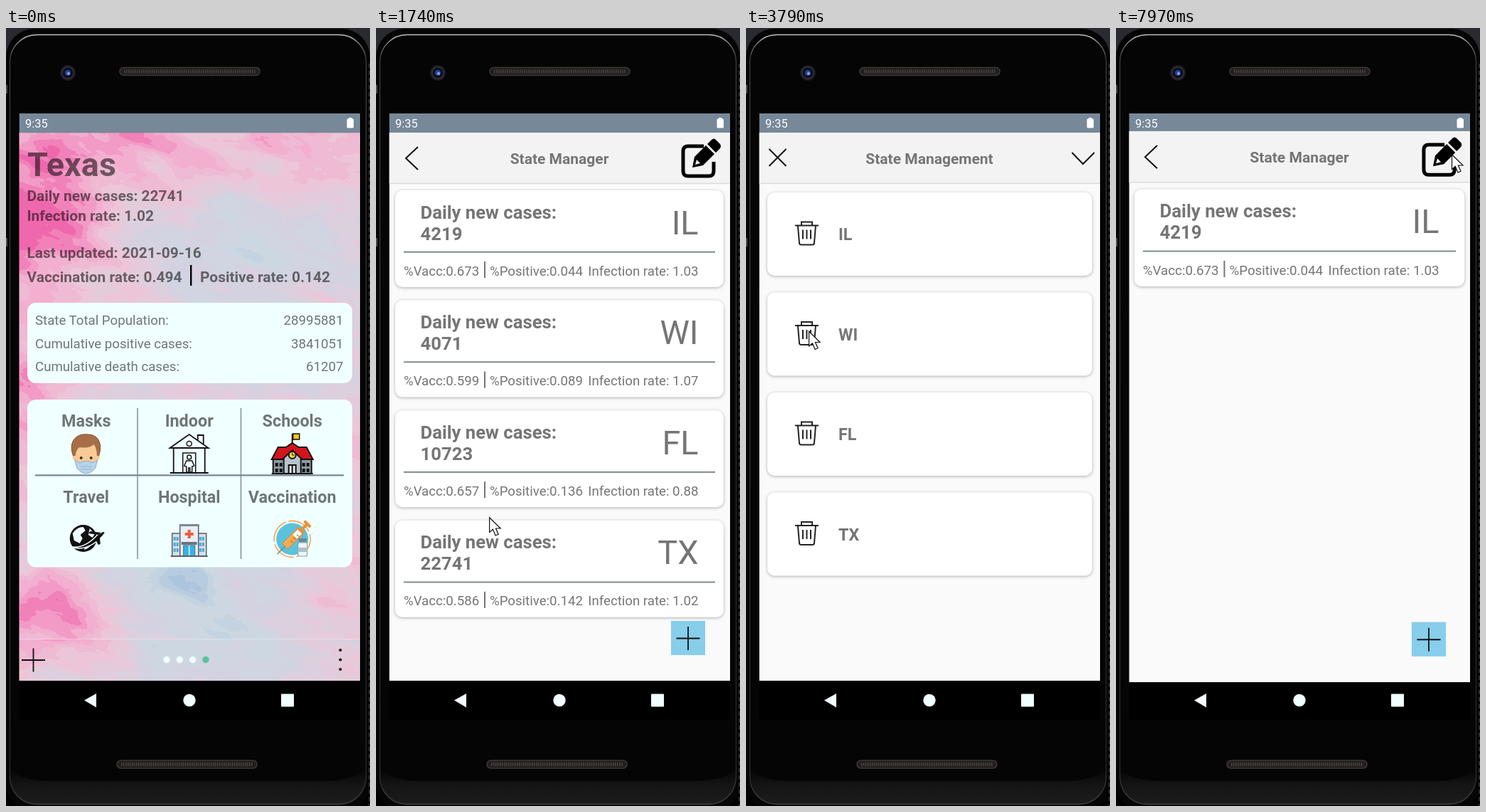
These frames come from a looping animation (512x1093 px, 7.99 s). An HTML page with a canvas:

```html
<!DOCTYPE html>
<html lang="en">
<head>
<meta charset="utf-8">
<title>State tracker</title>
<style>
html, body { margin: 0; width: 100%; height: 100%; overflow: hidden; background: #000; }
body { position: relative; contain: strict; }
svg, .win { position: absolute; left: 0; top: 0; width: 512px; height: 1093px; }
svg { overflow: hidden; }
#screen { position: absolute; inset: 0; overflow: hidden; clip-path: inset(120px 14px 121px 18.5px); }
.win { transform-origin: 258px 532px; }
canvas { position: absolute; left: 18px; top: 147px; }
text { font-family: Roboto, "Open Sans", sans-serif; fill: #757575; }
#home text { fill: #000; fill-opacity: .54; }
#top text { fill: #fff; }
.card { fill: #fff; filter: drop-shadow(0 1px 2px rgba(0,0,0,.3)); }
</style>
</head>
<body>
<svg id="phone" viewBox="0 0 512 1093"></svg>
<div id="screen">
  <div class="win" id="home"></div>
  <div class="win" id="manager"></div>
  <div class="win" id="editor"></div>
</div>
<svg id="top" viewBox="0 0 512 1093"></svg>
<script>
const $ = id => document.getElementById(id);
const LOOP = 7990, INK = '#111', SLATE = '#778899', ICE = '#f0ffff';

// Markup helpers
const attrs = (a = {}) => Object.entries(a).map(([k, v]) => ` ${k}="${v}"`).join('');
const rect = (x, y, w, h, fill, a) => `<rect x="${x}" y="${y}" width="${w}" height="${h}" fill="${fill}"${attrs(a)}/>`;
const circle = (x, y, r, fill, a) => `<circle cx="${x}" cy="${y}" r="${r}" fill="${fill}"${attrs(a)}/>`;
const path = (d, fill, stroke = 'none', w = 2, a) =>
  `<path d="${d}" fill="${fill}" stroke="${stroke}" stroke-width="${w}"${attrs(a)}/>`;
const line = (d, stroke = INK, w = 2, a) => path(d, 'none', stroke, w, a);
const edge = (stroke, w = 1.5) => ({ stroke, 'stroke-width': w });
const label = (s, x, y, size, bold, anchor = 'start') =>
  `<text x="${x}" y="${y}" font-size="${size}" font-weight="${bold ? 700 : 400}" text-anchor="${anchor}">${s}</text>`;
const at = (x, y, s) => `<g transform="translate(${x} ${y})">${s}</g>`;
const each = (list, fn) => list.map(fn).join('');
const svg = s => `<svg viewBox="0 0 512 1093">${s}</svg>`;
const card = (x, y, w, h) => `<rect class="card" x="${x}" y="${y}" width="${w}" height="${h}" rx="10"/>`;
const plus = (x, y, r) => line(`M${x - r} ${y}h${2 * r}M${x} ${y - r}v${2 * r}`, INK, 1.8);
const bars = rect(18.5, 120, 479.5, 27.3, SLATE) + rect(18.5, 917, 479.5, 90, '#000');
const page = title => bars + rect(18.5, 147, 479.5, 770, '#fafafa') + rect(18.5, 147, 479.5, 71, '#f3f3f3') +
  rect(18.5, 217.6, 479.5, 1.6, '#dcdcdc') + label(title, 258, 190.7, 21, 1, 'middle');

// Phone body
const gradient = (id, ...stops) => `<linearGradient id="${id}" x2="0" y2="1">${
  each(stops, ([o, c]) => `<stop offset="${o}" stop-color="${c}"/>`)}</linearGradient>`;
const grille = (x, y) => rect(x, y, 197, 11, '#221e1e', { rx: 5.5, ...edge('#3d3838') }) +
  line(`M${x + 6} ${y + 5.5}h185`, '#4a4444', 5, { 'stroke-dasharray': '1.5 1.5' });
$('phone').innerHTML = gradient('base', [0, '#000'], [.5, '#141414'], [1, '#1d1d1d']) +
  gradient('rim', [0, '#b9c0bd'], [.03, '#3c403f'], [.95, '#262828'], [1, '#444']) +
  rect(0, 0, 512, 60, '#2a2a31') + rect(0, 1, 512, 1100, '#050505', { rx: 40 }) +
  path('M6 1035Q8 1056 60 1058H450Q503 1056 506 1035V1052Q504 1091 466 1091H46Q8 1091 6 1052Z', 'url(#base)') +
  rect(5.5, 9.5, 501, 1081, 'none', { rx: 38, ...edge('url(#rim)', 1.3) }) +
  line('M1 80v12M1 295v12', '#48484b') + line('M511 50V1093', '#55555a', 1, { 'stroke-dasharray': '6 4' }) +
  grille(160, 55.5) + grille(156, 1029) +
  circle(87, 63, 11, '#1c1c22') + circle(87, 63, 8, '#0c0e16', edge('#30333e')) +
  circle(87, 63, 4, '#27439a') + circle(88, 64, 2, '#83a6ee');

// Marbled wallpaper: soft pink and blue pools, warped and streaked by noise
let seed = 7;
const random = () => (seed = (seed * 16807) % 2147483647) / 2147483647;
const lattice = Array.from({ length: 4096 }, random);
const cell = (x, y) => lattice[(x & 63) + 64 * (y & 63)];
const fade = u => u * u * (3 - 2 * u);
const mix = (a, b, u) => a + (b - a) * u;
function noise(x, y) {
  const i = Math.floor(x), j = Math.floor(y), u = fade(x - i);
  return mix(mix(cell(i, j), cell(i + 1, j), u), mix(cell(i, j + 1), cell(i + 1, j + 1), u), fade(y - j)) - .5;
}
function fbm(x, y) {
  let sum = 0;
  for (let k = 0, amp = .52; k < 4; k++, amp /= 2) sum += amp * noise(x * 2.1 ** k, y * 2.1 ** k);
  return sum;
}
// Pool: x, y, width, height, pinkness
const pools = [
  [30, 280, 130, 150, .45], [230, 160, 260, 90, .28], [440, 180, 80, 60, .1], [320, 300, 110, 60, -.25],
  [30, 520, 70, 130, .35], [60, 830, 130, 70, .36], [215, 790, 65, 70, -.48], [330, 850, 60, 90, -.2], [470, 700, 90, 220, .14]
];
const ramp = [[172, 196, 222], [203, 216, 226], [213, 210, 224], [235, 200, 217], [243, 170, 205], [239, 104, 173]];
function tint(v) {
  const f = Math.max(0, Math.min(.999, Math.round(v * 13) / 13)) * 5, i = Math.floor(f);
  return ramp[i].map((c, k) => mix(c, ramp[i + 1][k], f - i));
}
function wallpaper() {
  const w = 480, h = 770, cv = document.createElement('canvas');
  cv.width = w; cv.height = h;
  const ctx = cv.getContext('2d'), img = ctx.createImageData(w, h);
  for (let y = 0, o = 0; y < h; y++) for (let x = 0; x < w; x++, o += 4) {
    const py = y > 711 ? y + 90 : y;
    const wx = x + 18 + 80 * fbm(x / 75, py / 75), wy = y + 147 + 80 * fbm(x / 75 + 30, py / 75 + 12);
    let v = .45 + .5 * fbm((x + py * .5) / 70 + 5, (py - x * .4) / 32 + 9);
    for (const [cx, cy, rx, ry, pink] of pools) v += pink * Math.exp(-(((wx - cx) / rx) ** 2) - ((wy - cy) / ry) ** 2);
    img.data.set([...tint(v), 255], o);
  }
  ctx.putImageData(img, 0, 0);
  return cv;
}

// Tile icons, centred on 0,0
const icons = {
  mask: path('M-16 8C-28-16-14-29 2-27 20-27 24-10 16 8z', '#a76f48', '#7c4f31', 1) +
    path('M-15 2Q-14-6-9-9 4-7 11-13 16-6 15 8 12 26 0 27-13 25-15 2z', '#f7ca96') +
    each([-1, 1], s => circle(16 * s, 6, 3, '#f7ca96') + circle(7 * s, 6, 2, '#333')) +
    path('M-16 9L-9 13Q0 8 9 13L16 9 13 20Q8 27 0 28-8 27-13 20z', '#b8d4ec', '#8caac8', 1) +
    line('M-8 18H8M-8 22H8', '#96b4d0', 1),
  house: line('M-27-8L0-27 27-8zM-22-8V27H22V-8M12-18V-26H20V-13M-27 27H27', INK, 1.8) +
    circle(0, -14, 3.5, 'none', edge(INK)) + rect(-9, -1, 18, 28, 'none', edge(INK)) +
    circle(0, 5, 3, 'none', edge(INK)) + line('M-4 10H4L7 17 4 18V26H1V20H-1V26H-4V18L-7 17z', INK, 1.5),
  school: rect(-27, 8, 54, 20, '#8e9aa5', edge(INK, 2)) + path('M-12 28V0L0-9 12 0V28z', '#b9c3cb', INK) +
    path('M-29 8L-20-9H-9L0-15 9-9H20L29 8H14L0-5-14 8z', '#d2151d', INK) +
    line('M0-15V-28') + rect(1, -28, 9, 8, '#f9c51b', edge(INK)) +
    circle(0, 2, 5, '#f8cd48', edge(INK, 2)) + line('M0-1V2H3', INK, 1) +
    rect(-5, 16, 10, 12, '#dfe6ea', edge(INK, 2)) + line('M0 16V28M-29 28H29') +
    each([-24, -18, 14, 20], x => rect(x, 13, 4, 5, INK) + rect(x, 21, 4, 5, INK)),
  globe: circle(-4, -1, 19, INK) +
    path('M-19-8Q-13-17-4-17L-1-12-8-6-5-1-9 6-17 2zM5-15L12-7 9-2 3-6zM0 8L8 6Q4 14-3 15z', ICE) +
    path('M-25 10Q-4 16 16-6L24-11 27-9 23-4Q0 20-25 10z', INK, ICE, 1.4) +
    path('M17-6L3-8 6-11 21-9zM19-5L20 7 17 8 13 0z', INK),
  hospital: rect(-24, -8, 48, 32, '#d8e0e6', edge('#55616e')) + rect(-13, -19, 26, 43, '#e9eef2', edge('#55616e')) +
    rect(-14, -21, 28, 3, '#7b8794') + line('M0-13V-1M-6-7H6', '#ef5b40', 4) +
    rect(-8, 9, 16, 15, '#35b4e8', edge('#4b6577', 1)) + line('M0 9V24', '#dff4ff', 1.6) + rect(-11, 4, 22, 4, '#677583') +
    each([-21, -17, 15, 19], x => each([-3, 5, 13], y => rect(x - 1, y, 3, 5, '#4ba9d5'))) + line('M-26 24H26', '#55616e'),
  vaccine: circle(0, 0, 25.5, 'none', { ...edge('#f39b45', 1.4), 'stroke-dasharray': '34 4' }) + circle(0, 0, 22.5, '#5bc2dc') +
    `<g transform="rotate(45)">${line('M0 14V30', '#7a8b94', 1.5) + rect(-5, -16, 10, 30, '#fff', edge('#e98b35')) +
      rect(-4, -5, 8, 18, '#f5a84a') + rect(-2, -29, 4, 13, '#ee8f31') + rect(-7, -18, 14, 3, '#ee8f31') + rect(-6, -32, 12, 4, '#ee8f31') +
      line('M0-9H4M0-3H4M0 3H4', '#b65f18', 1)}</g>` +
    rect(8, 5, 13, 19, '#eef4f6', { rx: 2, ...edge('#8ba4ae', 1.2) }) + rect(9, -1, 11, 5, '#73858d') + rect(8, 12, 13, 6, '#aebfc7')
};

// Home
const heads = ['Daily new cases: 22741', 'Infection rate: 1.02', 'Last updated: 2021-09-16', 'Vaccination rate: 0.494'];
const stats = { 'State Total Population:': 28995881, 'Cumulative positive cases:': 3841051, 'Cumulative death cases:': 61207 };
const tiles = { Masks: 'mask', Indoor: 'house', Schools: 'school', Travel: 'globe', Hospital: 'hospital', Vaccination: 'vaccine' };
$('home').append(wallpaper());
$('home').insertAdjacentHTML('beforeend', svg(bars +
  label('Texas', 30, 208, 46.7, 1) +
  each(heads, (s, i) => label(s, 29.5, i < 2 ? 243 + 28 * i : 254.5 + 34 * i, 20.9, 1)) +
  label('Positive rate: 0.142', 273, 356.5, 20.9, 1) + rect(259, 333, 2.4, 29, '#000') +
  rect(30, 386, 457, 113, ICE, { rx: 12 }) +
  each(Object.entries(stats), ([s, n], i) =>
    label(s, 41, 417.3 + i * 32.5, 18.67) + label(n, 474.5, 417.3 + i * 32.5, 18.67, 0, 'end')) +
  rect(30, 522, 457, 235.5, ICE, { rx: 12 }) +
  line('M185 534V746M330.5 534V746', SLATE, 1.4) + line('M41 628.3H475', SLATE, 2.2) +
  each(Object.entries(tiles), ([s, icon], i) => {
    const x = 112.7 + i % 3 * 145, low = i > 2;
    return label(s, x, low ? 667 : 559.5, 23.33, 1, 'middle') + at(x, low ? 718 : 598, icons[icon]);
  }) +
  line('M18 858.5H498', '#ffffff55', 1) + plus(38.5, 888, 16.5) +
  each([0, 1, 2, 3], i => circle(226 + i * 18.3, 887.5, 4.7, i < 3 ? ICE : '#5cc298')) +
  each([-1, 0, 1], i => circle(470.3, 887.5 + i * 13.5, 2.1, INK))));

// State list
const states = [['IL', 4219, 0.673, 0.044, 1.03], ['WI', 4071, 0.599, 0.089, 1.07],
  ['FL', 10723, 0.657, 0.136, 0.88], ['TX', 22741, 0.586, 0.142, 1.02]];
const stateCard = ([name, cases, vacc, positive, rate], i) => `<g class="row">${at(0, i * 154.6,
  card(27, 228, 462, 136) + label('Daily new cases:', 62.5, 267.5, 25.67, 1) + label(cases, 62.5, 297.5, 25.67, 1) +
  label(name, 453.5, 289.5, 46.7, 0, 'end') + rect(39, 313.7, 438, 2, '#7f8c8d') +
  label('%Vacc:' + vacc, 39, 347.5, 18.67) + rect(152, 328, 2, 23, '#757575') +
  label('%Positive:' + positive, 160, 347.5, 18.67) + label('Infection rate: ' + rate, 453.5, 347.5, 18.67, 0, 'end'))}</g>`;
$('manager').innerHTML = svg(page('State Manager') + line('M59 167L42 183 59 199') +
  line('M461 166H439Q432 166 432 173V201Q432 208 439 208H468Q475 208 475 201V188', '#000', 5) +
  path('M445 196L448 181 464 165 476 177 460 193zM466 163L472 157Q475 154 478 157L484 163Q486 166 484 169L478 175z', '#000') +
  path('M449 192l2-7 5 5z', '#f3f3f3') + each(states, stateCard) +
  rect(415, 833, 48, 48, '#87ceeb') + plus(439, 857.5, 16.5));

// Editing list
const trash = line('M69 277.5h33M78 277v-4.5h15v4.5M73 278l2 24q0 2.5 3 2.5h15q3 0 3-2.5l2-24' +
  each([80, 85.5, 91], x => `M${x} 283.5v13`), '#222');
const editCard = ([name], i) => `<g class="row">${at(0, i * 140.5,
  card(30, 231, 457, 117) + trash + label(name, 130, 298.3, 23.33, 1))}</g>`;
$('editor').innerHTML = svg(page('State Management') + line('M32.5 170l24 24m0-24l-24 24') +
  line('M458.5 175L474 191 490 175') + each(states, editCard));

// Fixed overlay and pointer
$('top').innerHTML = label('9:35', 27, 140, 16.4) +
  rect(479.5, 127.5, 9.5, 13, '#fff', { rx: 1.5 }) + rect(482, 126, 4.5, 2, '#fff') +
  path('M110 944.5L127 935V954.5z', ICE) + circle(258, 944.5, 8.7, ICE) + rect(387, 935.5, 18, 18, ICE, { rx: 1 }) +
  `<g id="cursor">${path('M.5 .8V21.5L5.3 17.3 9 26 13 24.3 9.4 16H16z', '#fff', INK, 1.2)}</g>`;

// Motion
const clamp = v => Math.max(0, Math.min(1, v));
const ease = p => 1 - (1 - clamp(p)) ** 4.7;

// Pointer stops: time, x, y, rest
const stops = [
  [110, 355, 1090], [860, 40.5, 881, 620], [1740, 158.5, 688], [2060, 416, 255], [2380, 464, 161], [2530, 461, 181, 370],
  [3500, 42, 398], [3830, 90, 426, 450], [4430, 93, 383], [5070, 83.5, 432, 630],
  [5940, 157, 494, 150], [6270, 160, 489, 370], [7010, 460, 188], [7160, 475, 156], [7320, 472, 177, 670]
];
const route = stops.flatMap(([t, x, y, rest]) => rest ? [[t, x, y], [t + rest, x, y]] : [[t, x, y]]);
const rise = (i, k) => (route[i + 1][k] - route[i][k]) / (route[i + 1][0] - route[i][0]);
function slope(i, k) {
  if (i === 0) return rise(0, k);
  if (i === route.length - 1) return 0;
  const a = rise(i - 1, k), b = rise(i, k);
  return a * b <= 0 ? 0 : 2 * a * b / (a + b);
}
function pointer(t, k) {
  const i = Math.max(0, route.findLastIndex(p => t >= p[0]));
  if (i === route.length - 1) return route[i][k];
  const span = route[i + 1][0] - route[i][0], u = clamp((t - route[i][0]) / span);
  return mix(route[i][k], route[i + 1][k], fade(u)) +
    span * (slope(i, k) * u * (1 - u) ** 2 - slope(i + 1, k) * u * u * (1 - u));
}

function place(id, shown, scale, opacity = 1) {
  const s = $(id).style;
  s.visibility = shown ? 'visible' : 'hidden';
  s.transform = scale === 1 ? 'none' : `scale(${scale})`;
  s.opacity = opacity;
}
const OPEN = 1275, EDIT = 2717, CLOSE = 7785, SHIFT = 400, FADE = 83;
const removals = [4090, 4950, 5400];
const rows = id => [...document.querySelectorAll(`#${id} .row`)];
const managerRows = rows('manager'), editorRows = rows('editor');

function render(t) {
  const [open, edit, close] = [OPEN, EDIT, CLOSE].map(s => ease((t - s) / SHIFT));
  const closing = t >= CLOSE + 35;
  place('home', t < OPEN + SHIFT, 1 + .05 * open);
  place('manager', t >= OPEN && (t < EDIT + SHIFT || closing),
    closing ? 1.1 - .1 * close : (.85 + .15 * open) * (1 + .05 * edit), clamp((t - OPEN) / FADE));
  place('editor', t >= EDIT, closing ? 1 - .1 * close : .85 + .15 * edit,
    closing ? 1 - clamp((t - CLOSE - 35) / FADE) : clamp((t - EDIT) / FADE));

  const gone = removals.filter(s => t >= s).length;
  const left = [states[0], ...states.slice(1 + gone)];
  editorRows.forEach((row, i) => {
    row.style.display = left[i] ? '' : 'none';
    if (left[i]) row.querySelector('text').textContent = left[i][0];
  });
  managerRows.forEach((row, i) => row.style.display = left[i] ? '' : 'none');

  $('cursor').style.display = t < stops[0][0] ? 'none' : '';
  $('cursor').setAttribute('transform', `translate(${pointer(t, 1).toFixed(1)} ${pointer(t, 2).toFixed(1)})`);
}

const start = performance.now();
function tick() {
  render((performance.now() - start) % LOOP);
  requestAnimationFrame(tick);
}
render(0);
requestAnimationFrame(tick);
</script>
</body>
</html>
```
